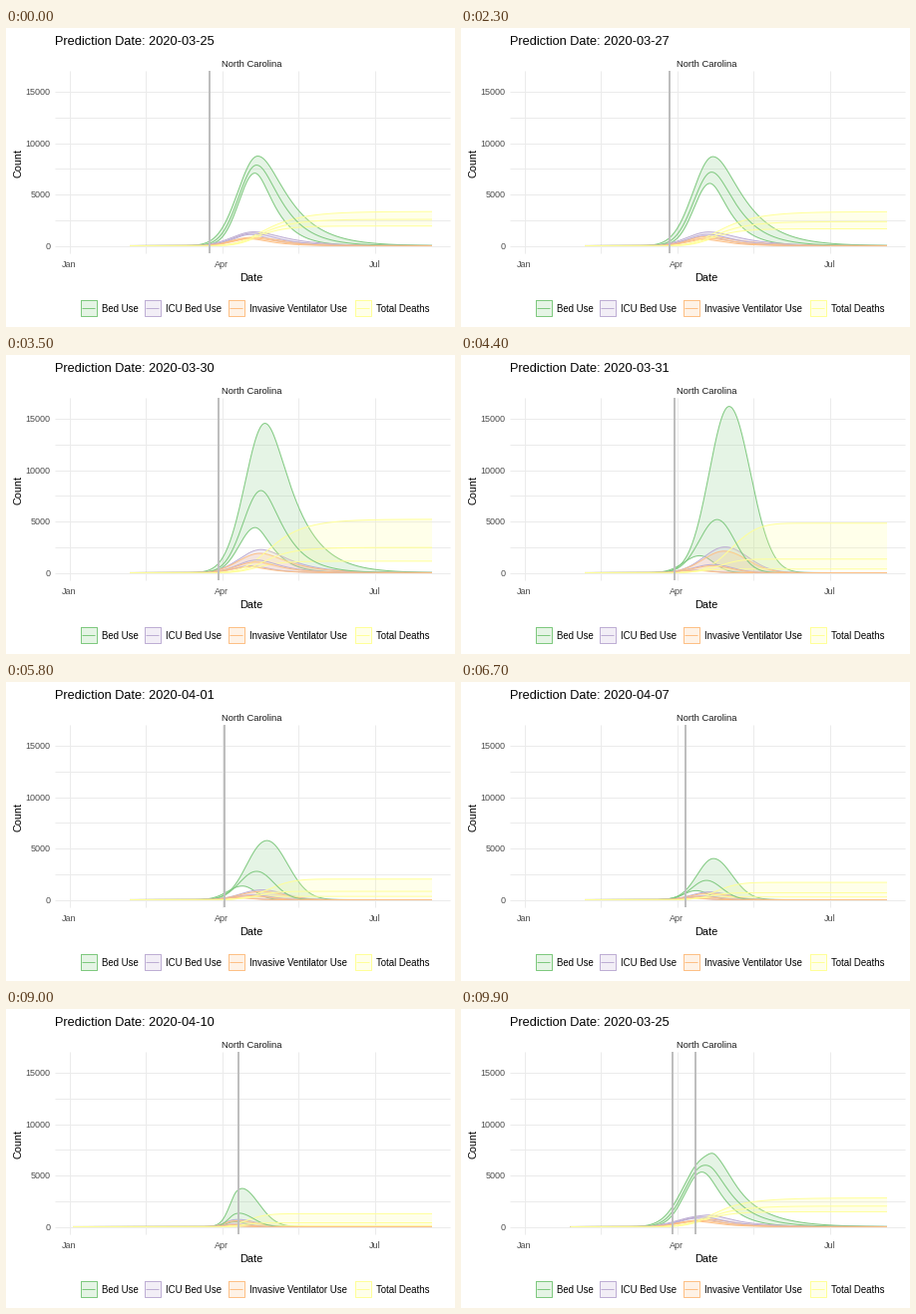
A matplotlib script that plays this animation: 450 px wide and 300 px high, repeating every 10 s.

```python
import numpy as np
import matplotlib.pyplot as plt
from matplotlib.animation import FuncAnimation
from matplotlib.patches import Polygon, Rectangle

W, H, DPI = 450, 300, 100
PX = 72 / DPI                      # one pixel in points
DAY = 1.6813                       # pixels per day
TOP, BOTTOM, LEFT, RIGHT = 43, 226, 49, 445
END = 427                          # last forecast day
U = np.linspace(0, 1, 420)
COLORS = ["#7FC97F", "#BEAED4", "#FDC086", "#FFFF99"]
NAMES = ["Bed Use", "ICU Bed Use", "Invasive Ventilator Use", "Total Deaths"]

plt.rcParams["font.family"] = "Liberation Sans"


def ypix(v):
    return 218.5 - v * 51.7 / 5000


def hump(x, mid, rise, fall, tail):
    """Gaussian rise, then a Gaussian or an exponential fall."""
    d = x - mid
    after = (d / fall) ** 2
    if tail:
        after = 0.73 * (np.sqrt(1 + after) - 1)
    return np.exp(-np.where(d < 0, (d / rise) ** 2, after))


def forecast(high, ratio, mid, gap, rise, fall, tail=False,
             icu=0.155, vent=0.13, lethal=0.0058, start=124):
    """x positions and twelve curves: upper, middle, lower of each measure."""
    x = start + (END - start) * U
    rows = []
    for share, shift in ((1, 0), (icu, 4), (vent, 5)):
        wide = 1.08 if shift else 1
        for i in range(3):
            rows.append(share * high * ratio ** i
                        * hump(x, mid - shift - gap * i ** 1.3,
                               rise * (1 - 0.1 * i) * wide,
                               fall * (1 - 0.17 * i) * wide, tail))
    # deaths accumulate with the beds in use
    for beds in rows[:3]:
        total = lethal * np.cumsum(beds) * (x[1] - x[0])
        rows.append(np.interp(x - 2, x, total))
    return x, ypix(np.array(rows))


LATE = dict(icu=0.19, vent=0.155, lethal=0.0097)
mar25 = forecast(8700, 0.9, 252.3, 1.2, 28, 20, tail=True, vent=0.095)
mar29 = forecast(8500, 0.6, 253, 1.5, 28, 20, tail=True)
mar30 = forecast(14500, 0.55, 259.5, 4, 28, 18, tail=True)
mar31 = forecast(16140, 0.32, 268.7, 12, 28, 30)
apr01 = forecast(8100, 0.47, 266, 11.5, 28, 28)
apr05 = forecast(4000, 0.47, 253, 7, 23, 26, **LATE)
apr08 = forecast(3700, 0.38, 244, 4, 20, 24, start=67, **LATE)
apr10 = forecast(3600, 0.38, 240, 3.5, 18, 24, start=67, **LATE)
apr12 = forecast(4100, 0.33, 232, 2, 11, 24, start=67, **LATE)

# days after March 25, and the forecast of that day
STATES = [(0, mar25), (1, mar25), (2, mar25), (4, mar29), (5, mar30),
          (6, mar31), (7, apr01), (11, apr05), (13, apr05), (14, apr08),
          (16, apr10), (18, apr12)]
STARTS = [5 + 8 * i + min(i, 4) for i in range(len(STATES))]


def date_title(n):
    d = 25 + n
    month, day = (3, d) if d <= 31 else (4, d - 31)
    return f"Prediction Date: 2020-{month:02d}-{day:02d}"


def marker_left(n):
    return np.floor(203.8 + DAY * n)


fig = plt.figure(figsize=(W / DPI, H / DPI), dpi=DPI, facecolor="white")
ax = fig.add_axes([0, 0, 1, 1])
ax.set_xlim(0, W)
ax.set_ylim(H, 0)
ax.axis("off")


def line(x, y, color, z):
    return ax.plot(x, y, color=color, lw=PX, zorder=z,
                   solid_capstyle="butt")[0]


def label(x, y, s, size, color="black", **kw):
    return ax.text(x, y, s, fontsize=size * PX, color=color,
                   va="baseline", zorder=50, **kw)


# grid and axis text
for v in range(0, 17500, 2500):
    y = np.floor(ypix(v)) + 0.5
    line([LEFT, RIGHT], [y, y], "#EBEBEB", 1)
    if v % 5000 == 0:
        label(44.5, y + 3.5, str(v), 9, "#4D4D4D", ha="right")
for i, s in enumerate(["Jan", "", "Apr", "", "Jul"]):
    x = np.floor(63.4 + 76.5 * i) + 0.5
    line([x, x], [TOP, BOTTOM], "#EBEBEB", 1)
    label(x - 0.3, 240, s, 9, "#4D4D4D", ha="center")
label(246, 254, "Date", 11, ha="center")
label(15, 136, "Count", 10.8, ha="center", rotation=90, rotation_mode="anchor")
label(246.3, 39, "North Carolina", 9.35, "#1A1A1A", ha="center")
title = label(48.7, 17, "", 12.8)

# legend
for x, name, c in zip((74, 138, 222, 349), NAMES, COLORS):
    ax.add_patch(Rectangle((x + 0.5, 272.5), 16, 16, fc=c, alpha=0.2, lw=0))
    line(x + 0.5 + np.array([0, 16, 16, 0, 0]),
         272.5 + np.array([0, 0, 16, 16, 0]), c, 3)
    line([x + 2, x + 15], [280.5, 280.5], c, 3)
    label(x + 22, 285, name, 9.6)

# ribbons, their edges and the middle lines
ribbons, curves = [], []
for g, c in enumerate(COLORS):
    ribbon = Polygon([(0, 0), (1, 0), (1, 1)], fc=c, alpha=0.2, lw=0, zorder=5 + g)
    ribbons.append(ax.add_patch(ribbon))
    for z in (5.5 + g, 15 + g, 5.5 + g):
        curves.append(line([], [], c, z))

markers = [ax.add_patch(Rectangle((0, TOP), 2, BOTTOM - TOP, fc="#BEBEBE",
                                  lw=0, zorder=30, antialiased=False))
           for _ in range(2)]


def update(frame):
    a = b = 0
    t = 1.0
    for i, s in enumerate(STARTS):
        if frame >= s:
            a, b = i, (i + 1) % len(STATES)
            t = min((frame - s + 1) / 4, 1)

    (day_a, (xa, ya)), (day_b, (xb, yb)) = STATES[a], STATES[b]
    x = xa + (xb - xa) * t
    y = ya + (yb - ya) * t
    for curve, row in zip(curves, y):
        curve.set_data(x, row)
    for g, ribbon in enumerate(ribbons):
        up, low = y[3 * g], y[3 * g + 2]
        ribbon.set_xy(np.column_stack([np.r_[x, x[::-1]], np.r_[up, low[::-1]]]))

    title.set_text(date_title(day_b if t > 0.5 else day_a))
    markers[0].set_x(marker_left(day_a + (day_b - day_a) * t))
    # the last date's second marker stays put until the loop restarts
    markers[1].set_x(marker_left(STATES[-1][0]))
    markers[1].set_visible(frame >= STARTS[-1])
    return curves + ribbons + markers + [title]


anim = FuncAnimation(fig, update, frames=100, interval=100, repeat=True,
                     repeat_delay=0, init_func=lambda: update(0), blit=False)
plt.show()
```
